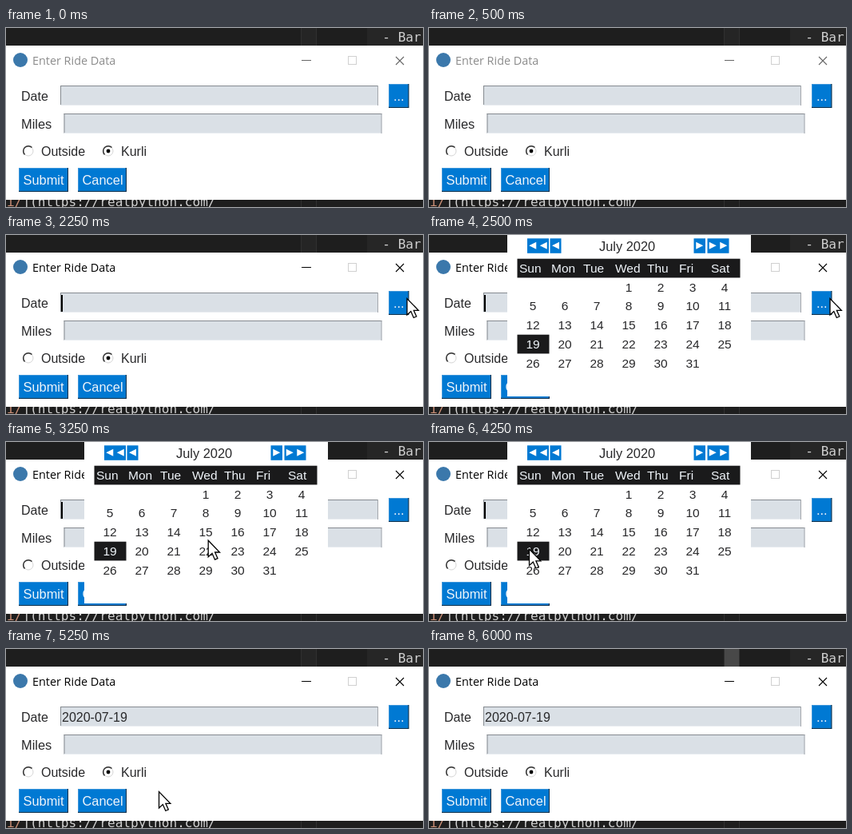
Animation of 522x224 px, one loop 6.25 s. Source, as an HTML page:

```html
<!DOCTYPE html>
<html lang="en">
<head>
<meta charset="utf-8">
<title>Enter Ride Data</title>
<style>
  html, body { margin: 0; width: 100%; height: 100%; overflow: hidden; background: #1e1e1e; }
  svg { display: block; width: 522px; height: 224px; }
  text { font: 16px "Liberation Sans", Arial, sans-serif; fill: #28282a; white-space: pre; }
  .mono { font: 16.1px "DejaVu Sans Mono", monospace; fill: #d0d0d0; }
  .title { font: 14.4px "Open Sans", sans-serif; }
  .wide { font-size: 16.4px; }
  .cal { font-size: 15.5px; }
  .mid { text-anchor: middle; }
  .white { fill: #f0f5fa; }
</style>
</head>
<body>
<svg id="stage" viewBox="0 0 522 224"></svg>
<script>
const LOOP = 6250, BLUE = '#0079d3', INK = '#1a1a1b';

const rect = (x, y, w, h, fill, more = '') =>
  `<rect x="${x}" y="${y}" width="${w}" height="${h}" fill="${fill}" ${more}/>`;
const text = (x, y, str, cls = '') => `<text x="${x}" y="${y}" class="${cls}">${str}</text>`;

const field = (x, y) => rect(x, y, 398, 25, '#dae0e6') +
  rect(x, y, 398, 1, '#858a90') + rect(x, y, 1, 25, '#858a90') +
  rect(x, y + 24, 398, 1, '#e8ecf0') + rect(x + 397, y, 1, 25, '#a4a8ad');

const button = (x, y, w, label, tx) => rect(x, y, w, 30, '#0b304d') +
  rect(x, y, w - 1.3, 28.7, '#3f97da') + rect(x + 1, y + 1, w - 2.3, 27.7, BLUE) +
  text(tx, y + 21, label, 'wide white');

const radio = (x, y) => `<circle cx="${x}" cy="${y}" r="6" fill="#fff" stroke="#d5d5d5"/>
  <path d="M${x - 4.5} ${y + 4.5}A6.3 6.3 0 0 1 ${x + 4.5} ${y - 4.5}" fill="none" stroke="#333" stroke-width="1.5"/>`;

// Calendar navigation button with triangles pointing in direction dir
const nav = (x, w, count, dir) => {
  let s = rect(x, 4.3, w, 18.5, BLUE);
  for (let i = 0; i < count; i++) {
    const c = x + w * (i + .5) / count;
    s += `<path d="M${c - 4.5 * dir} 8.7v9l${9 * dir} -4.5z" fill="#fff"/>`;
  }
  return s;
};

const calendar = () => {
  const left = 110.5, top = 29.7, step = 23.75;
  let s = rect(98, 0, 305, 202, '#fff') + nav(123, 27, 2, -1) + nav(151.5, 14, 1, -1) +
    nav(331.5, 14.5, 1, 1) + nav(348.5, 27, 2, 1) + text(213, 20.3, 'July 2020', 'wide') +
    rect(left, top, 279, step, INK) + rect(left, top + 4 * step, 40, step, INK);
  'Sun Mon Tue Wed Thu Fri Sat'.split(' ').forEach((d, i) => s += text(113 + 40 * i, 47, d, 'cal white'));
  for (let d = 1; d <= 31; d++) {
    const cell = d + 2, row = Math.floor(cell / 7);
    s += text(130 + 40 * (cell % 7), 70.7 + step * row, d, 'cal mid' + (d === 19 ? ' white' : ''));
  }
  return s;
};

const stage = document.getElementById('stage');
stage.innerHTML =
  rect(0, 0, 522, 224, '#1e1e1e') + rect(452, 0, 70, 22, '#262626') +
  rect(369, 0, 1, 224, '#303030') + rect(388, 0, 1, 224, '#303030') +
  rect(370, 0, 18, 22, '#252525', 'id="slider"') +
  text(471.3, 17.3, '- Bar', 'mono') +
  text(1, 223.3, '<tspan fill="#ce9178">i/</tspan>](https://realpython.com/', 'mono') +
  rect(0, 22, 522, 193, '#fff') +
  `<circle cx="18" cy="40" r="9" fill="#3b78ab"/>
  <g id="bar">${text(33, 46, 'Enter Ride Data', 'title')}
    <path d="M370 40.5h12M488 36l10 10m0 -10l-10 10" fill="none" stroke="currentColor" stroke-width="1.1"/></g>
  <rect x="428.5" y="35.5" width="10" height="10" fill="none" stroke="#d0d0d0"/>` +
  text(19, 91, 'Date') + field(68, 72) + button(479, 70, 25.5, '...', 485) +
  text(19, 126, 'Miles', 'wide') + field(72.5, 107) +
  radio(28, 154) + text(44, 160, 'Outside') +
  radio(128, 154) + '<circle cx="128" cy="154" r="2.4"/>' + text(144, 160, 'Kurli') +
  button(16, 175, 62, 'Submit', 21.5) + button(90, 175, 61, 'Cancel', 95.5) +
  `<g id="date">${text(70, 91, '2020-07-19')}</g>` +
  rect(69, 75, 2, 21, '#000', 'id="caret"') +
  `<g id="popup">${calendar()}</g>
  <path id="pointer" d="M.5 .5V21L5.3 16.6L8.8 24.5L12.3 23L8.9 15.3H14.8Z" fill="#fff" stroke="#000" stroke-width="1.3"/>`;

const [slider, bar, date, caret, popup, pointer] =
  ['slider', 'bar', 'date', 'caret', 'popup', 'pointer'].map(id => document.getElementById(id));

// Pointer stops: start time, x, y (no position = off stage)
const stops = [
  [0], [250, 464, 216], [500], [1500, 507, 79], [1750, 501.5, 79], [2750, 367, 106],
  [3000, 279, 116], [3250, 252.7, 122.7], [3750, 185, 145], [4000, 122, 131], [4250, 125, 133.5],
  [5000, 131, 144], [5250, 191, 178], [5500, 220, 204], [5750]
];
// Times at which the caret switches on or off
const blinks = [2250, 2750, 3000, 3750, 4000, 5000, 5500, 6000];

const show = (el, on) => el.style.display = on ? '' : 'none';

function draw(now) {
  const t = now % LOOP;
  const [, x, y] = stops.findLast(s => s[0] <= t);
  show(pointer, x !== undefined);
  if (x !== undefined) pointer.setAttribute('transform', `translate(${x} ${y})`);

  const active = t >= 2250, done = t >= 4500;
  bar.style.color = active ? '#000' : '#666';
  bar.firstChild.style.fill = active ? '#000' : '#8c8c8c';
  show(popup, t >= 2500 && !done);
  show(date, done);
  show(caret, blinks.filter(b => b <= t).length % 2);
  caret.setAttribute('x', done ? 150 : 69);
  slider.setAttribute('fill', t >= 6000 ? '#484848' : t >= 5750 ? '#363636' : '#252525');
}

const start = performance.now();
function tick() {
  draw(performance.now() - start);
  requestAnimationFrame(tick);
}
tick();
</script>
</body>
</html>
```
